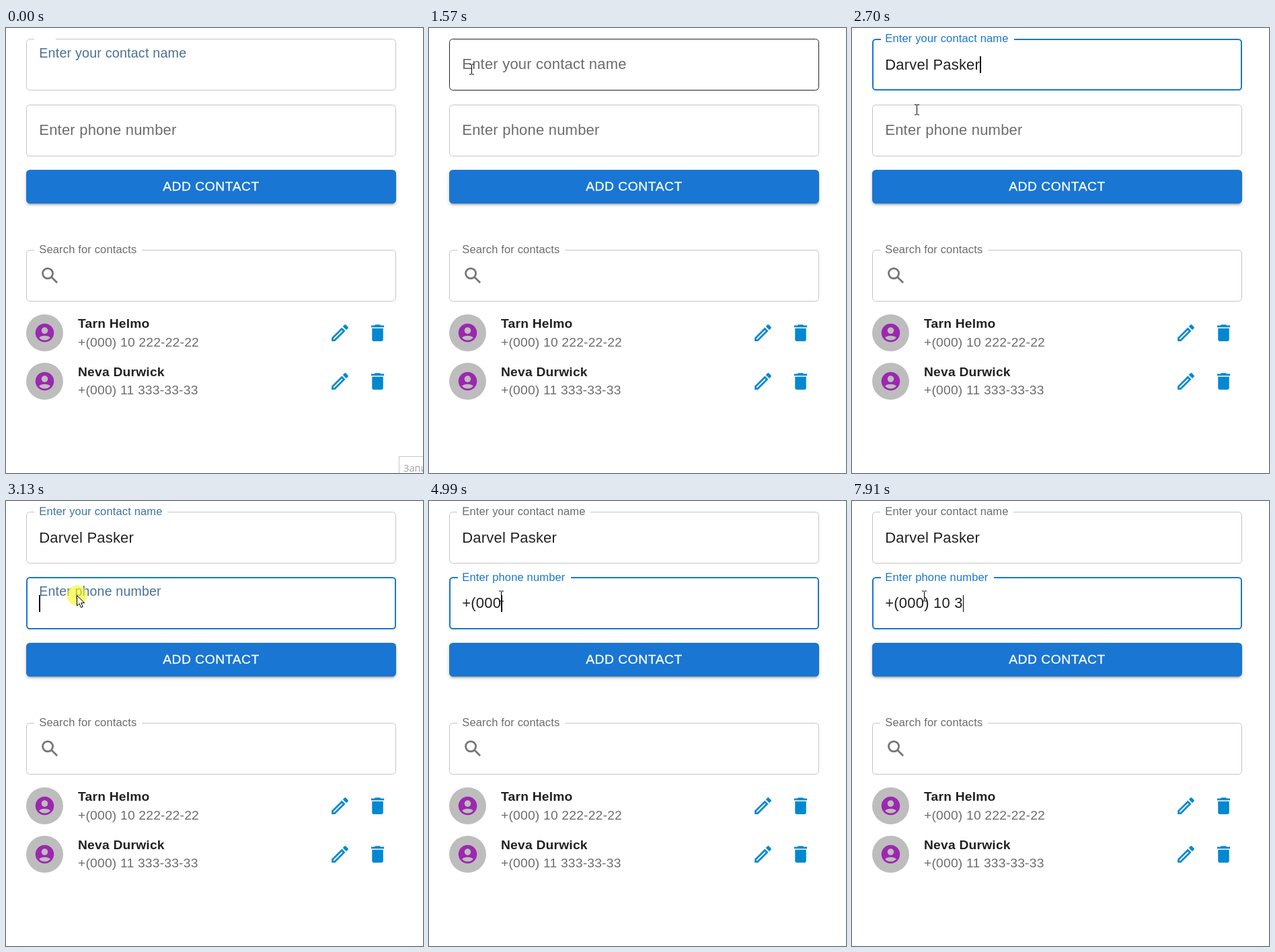
An HTML page for the animation above (8 s loop, 620 by 662 pixels).

```html
<!DOCTYPE html>
<html lang="en">
<head>
<meta charset="utf-8">
<title>Contact book</title>
<style>
  html, body { margin: 0; width: 620px; height: 662px; overflow: hidden; background: #fff; }
  body { position: relative; font: 22px/31.6px "Liberation Sans", Arial, sans-serif; letter-spacing: .00938em; color: #212121; }
  .field, .field > *, .row, .row > *, .add, .tip, .mouse, .caret { position: absolute; }
  .field { left: 30px; width: 550px; height: 77px; }
  fieldset { left: 0; top: -7px; width: 550px; height: 84px; box-sizing: border-box; margin: 0; padding: 0 11px; border: 1px solid #c4c4c4; border-radius: 5.5px; min-width: 0; }
  legend { height: 15px; padding: 0; font-size: 16.5px; line-height: 15px; overflow: hidden; white-space: nowrap; visibility: hidden; }
  legend span { display: inline-block; padding: 0 6.9px; }
  .label { left: 0; top: 0; transform-origin: 0 0; white-space: nowrap; }
  .value { left: 19.25px; top: 22.7px; height: 31.6px; white-space: pre; }
  .caret { left: 100%; top: 3.3px; width: 1.5px; height: 25px; background: #000; }
  .add { left: 30px; top: 211px; width: 550px; height: 50px; border-radius: 5.5px; background: #1976d2; color: #fff; font-size: 19.25px; line-height: 50px; letter-spacing: .02857em; text-align: center; -webkit-text-stroke: .3px #fff;
    box-shadow: 0 4px 1.4px -2.75px rgba(0,0,0,.2), 0 2.75px 2.75px rgba(0,0,0,.14), 0 1.4px 7px rgba(0,0,0,.12); }
  .row { left: 30px; width: 550px; height: 55px; font-size: 19.25px; line-height: 27.5px; letter-spacing: .01071em; }
  .row b, .row span { left: 77px; white-space: nowrap; }
  .row span { top: 27.5px; color: #6c6c6c; }
  .avatar { width: 55px; height: 55px; border-radius: 50%; background: #bdbdbd; }
  svg { position: absolute; width: 33px; height: 33px; overflow: visible; }
  .tip { left: 584px; top: 637px; width: 90px; height: 40px; box-sizing: border-box; padding-left: 6px; border: 1px solid #c6c6c6; font: 14.5px/34px "Open Sans", "Noto Sans", sans-serif; letter-spacing: 0; color: #a0a0a0; }
  .mouse { left: 0; top: 0; width: 1px; height: 1px; }
</style>
</head>
<body>
<div class="tip">Запись</div>
<div class="add">ADD CONTACT</div>
<svg class="mouse" id="mouse">
  <circle id="press" cx="-1" r="15" fill="rgba(252,248,20,.6)"/>
  <path id="beam" d="M-2.5-6.5h3m1 0h3M-2.5 8.5h3m1 0h3M1-6V8" fill="none" stroke="#000"/>
  <path id="arrow" d="M-1 0v15.5l3.6-3.4 2.5 5.9 2.6-1.1-2.5-5.7h5z" fill="#fff" stroke="#000"/>
</svg>
<script>
const LOOP = 8000, TICK = 67, BLINK = 530;
const GREY = [108, 108, 108], BLUE = [25, 118, 210];
const NAME_FOCUS = 1640, PHONE_FOCUS = 3048;
const $ = id => document.getElementById(id);
const mouse = $('mouse'), press = $('press'), beam = $('beam'), arrow = $('arrow');
const tip = document.querySelector('.tip');

// Mouse moves: start, duration, destination
const origin = { x: 352, y: 225 };
const moves = [
  { at: 288, ms: 280, x: 189, y: 45 },
  { at: 1250, ms: 200, x: 62, y: 60 },
  { at: 2530, ms: 380, x: 106, y: 140 }
];
const presses = [870, 1605, 3010];

// Text arriving in each field: time, characters
const nameKeys = [[1670, ''], [2410, 'Darvel Pasker']];
const phoneKeys = [[3080, ''], [4420, '+(0'], [4690, '0'], [4950, '0'], [5550, ') 1'], [5750, '0'], [7900, ' 3']];

const clamp = v => Math.min(1, Math.max(0, v));
const mix = (a, b, p) => a + (b - a) * p;
const show = (el, on) => { el.style.display = on ? '' : 'none'; };

// cubic-bezier(0, 0, .2, 1)
function ease(x) {
  x = clamp(x);
  let lo = 0, hi = 1;
  for (let i = 0; i < 20; i++) {
    const s = (lo + hi) / 2;
    if (.6 * (1 - s) * s * s + s ** 3 < x) lo = s; else hi = s;
  }
  return 3 * (1 - lo) * lo * lo + lo ** 3;
}

function add(html) {
  mouse.insertAdjacentHTML('beforebegin', html);
  return mouse.previousElementSibling;
}

function icon(x, y, color, shape) {
  return `<svg viewBox="0 0 24 24" style="left:${x}px;top:${y}px" fill="${color}">${shape}</svg>`;
}

function makeField(top, label) {
  const box = add(`<div class="field" style="top:${top}px"><fieldset><legend><span>${label}</span></legend></fieldset>
    <div class="label">${label}</div><div class="value"><span></span><i class="caret"></i></div></div>`);
  const find = s => box.querySelector(s);
  return { box, top, frame: find('fieldset'), legend: find('legend'), label: find('.label'),
    text: find('.value span'), caret: find('.caret') };
}

function drawField(f, { focus, hover, shrink, notch, tint, text = '', caret }) {
  f.frame.style.border = focus ? '2px solid #1976d2' : `1px solid ${hover ? '#212121' : '#c4c4c4'}`;
  f.legend.style.maxWidth = notch * 526 + 'px';
  f.label.style.transform = `translate(19.25px, ${mix(22, -12.375, shrink)}px) scale(${mix(1, .75, shrink)})`;
  f.label.style.color = `rgb(${GREY.map((g, i) => Math.round(mix(g, BLUE[i], tint)))})`;
  f.text.textContent = text;
  show(f.caret, focus && caret);
}

// Text so far, and a caret that starts a new blink with every key
function typed(keys, t) {
  const done = keys.filter(([at]) => at <= t);
  const last = done.length ? done.at(-1)[0] : t;
  return { text: done.map(([, s]) => s).join(''), caret: (t - last) % (2 * BLINK) < BLINK };
}

function makeRow(top, name, phone) {
  const person = '<circle cx="12" cy="12" r="10"/><g fill="#bdbdbd"><circle cx="12" cy="9.5" r="3.5"/>' +
    '<path d="M5.9 17.1Q8.3 15 12 15t6.1 2.1Q15.9 20 12 20t-6.1-2.9z"/></g>';
  const pencil = '<g transform="rotate(45 12 12)"><path d="M9.3 4.2h5.4v15.6L12 22.4l-2.7-2.6z" fill="none"/></g>' +
    '<path fill-rule="evenodd" d="M14.06 9.02l.92.92L5.92 19H5v-.92zM14.06 6.19L3 17.25V21h3.75L17.81 9.94z"/>' +
    '<path d="M15.13 5.12l1.83-1.83q.7-.6 1.41 0l2.34 2.34q.6.7 0 1.41l-1.83 1.83z"/>';
  const bin = '<path d="M6 19q0 2 2 2h8q2 0 2-2V7H6zM19 4h-3.5l-1-1h-5l-1 1H5v2h14z"/>';
  add(`<div class="row" style="top:${top}px"><div class="avatar"></div>${icon(11, 11, '#9c27b0', person)}
    <b>${name}</b><span>${phone}</span>${icon(450, 11, '#0288d1', pencil.slice(pencil.indexOf('</g>') + 4))}${icon(506, 11, '#0288d1', bin)}</div>`);
}

const nameField = makeField(16, 'Enter your contact name');
const phoneField = makeField(113.6, 'Enter phone number');
const searchField = makeField(330, 'Search for contacts');
searchField.box.insertAdjacentHTML('beforeend', icon(19.25, 22, 'none',
  '<g stroke="#757575" stroke-width="2"><circle cx="9.5" cy="9.5" r="5.5"/><path d="M13.7 13.7l6 6"/></g>'));
drawField(searchField, { shrink: 1, notch: 1, tint: 0 });
makeRow(426, 'Tarn Helmo', '+(000) 10 222-22-22');
makeRow(497.6, 'Neva Durwick', '+(000) 11 333-33-33');

function mouseAt(t) {
  return moves.reduce((from, m) => {
    const p = ease((t - m.at) / m.ms);
    return { x: mix(from.x, m.x, p), y: mix(from.y, m.y, p) };
  }, origin);
}

function draw(now) {
  const t = Math.floor(now / TICK) * TICK;
  const { x, y } = mouseAt(t);
  const visible = t > moves[0].at;
  const hover = f => visible && y > f.top + 7 && y < f.top + 70;
  const nameIn = ease((t - NAME_FOCUS) / 200);
  const phoneIn = ease((t - PHONE_FOCUS) / 200);
  // The name field has just lost focus when the loop begins.
  const nameOut = 1 - ease((t + 51) / 200);

  drawField(nameField, {
    focus: nameIn > 0 && phoneIn === 0,
    hover: hover(nameField),
    shrink: nameIn + nameOut,
    notch: ease((t - NAME_FOCUS - 50) / 100) + 1 - ease((t + 34) / 50),
    tint: nameIn + nameOut - phoneIn,
    ...typed(nameKeys, t)
  });
  drawField(phoneField, {
    focus: phoneIn > 0,
    hover: hover(phoneField),
    shrink: phoneIn,
    notch: ease((t - PHONE_FOCUS - 50) / 100),
    tint: phoneIn,
    ...typed(phoneKeys, t)
  });

  // Arrow between the fields and while the label slides under the mouse
  const pointing = (y > 94 && y < 113) || (phoneIn > 0 && phoneIn < .8);
  mouse.style.transform = `translate(${Math.round(x) + .5}px, ${Math.round(y) + .5}px)`;
  show(mouse, visible);
  show(press, presses.some(at => t >= at && t < at + 200));
  show(beam, !pointing);
  show(arrow, pointing);
  show(tip, t < TICK);
}

function loop() {
  draw(performance.now() % LOOP);
  requestAnimationFrame(loop);
}
loop();
</script>
</body>
</html>
```
